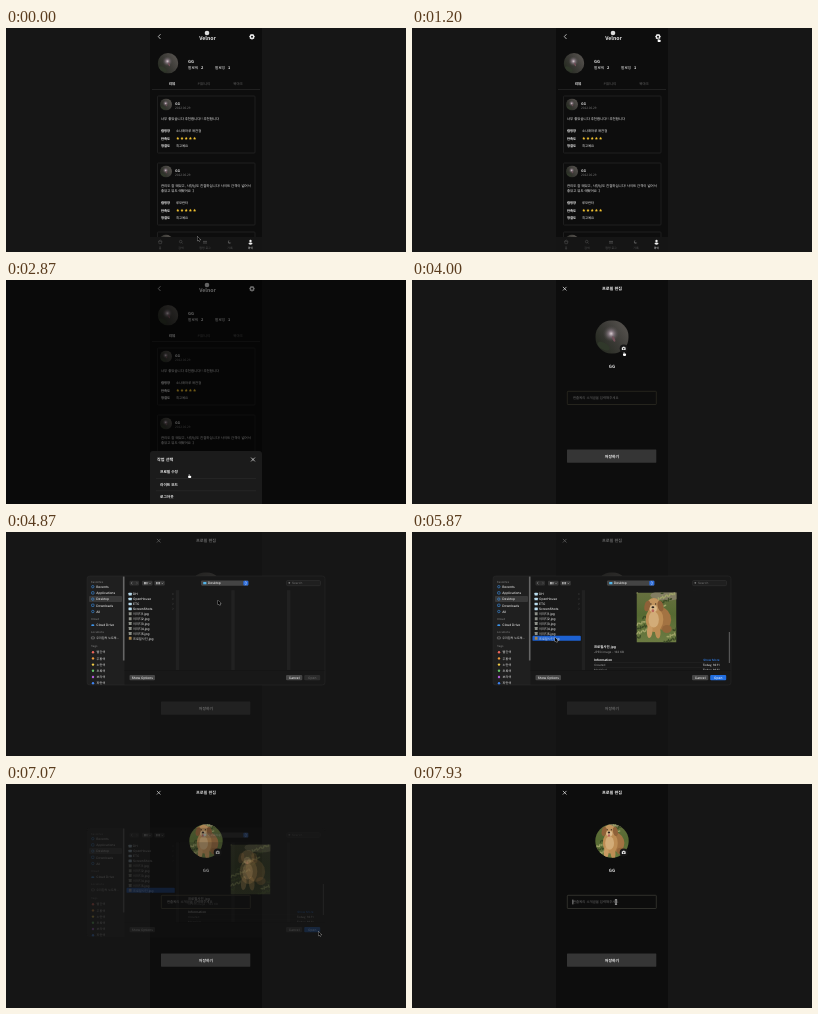
Animation, 400 px wide and 224 px high, one loop 8 s. Source, as an HTML page with a canvas:

```html
<!DOCTYPE html>
<html lang="ko">
<head>
<meta charset="utf-8">
<title>Profile photo</title>
<style>
html, body { margin: 0; width: 100%; height: 100%; overflow: hidden; background: #161616; }
canvas { display: block; width: 100vw; height: 100vh; }
</style>
</head>
<body>
<canvas id="stage"></canvas>
<script>
const W = 400, H = 224, LOOP = 8000;
const FONT = '"Noto Sans CJK KR", "Noto Sans CJK", "Noto Sans", sans-serif';
const UI_FONT = 'Inter, "Noto Sans CJK KR", "Noto Sans CJK", sans-serif';
const canvas = document.getElementById('stage');
const c = canvas.getContext('2d');

function resize() {
  const dpr = devicePixelRatio || 1;
  canvas.width = Math.round(innerWidth * dpr);
  canvas.height = Math.round(innerHeight * dpr);
}
addEventListener('resize', resize);
resize();

const clamp = v => Math.max(0, Math.min(1, v));
const smooth = v => v * v * (3 - 2 * v);
const ramp = (t, from, to) => smooth(clamp((t - from) / (to - from)));

function text(s, x, y, size, color = '#f4f4f4', { weight = 500, align = 'left', font = FONT } = {}) {
  c.font = `${weight} ${size}px ${font}`;
  c.textAlign = align;
  c.textBaseline = 'alphabetic';
  c.fillStyle = color;
  c.fillText(s, x, y + size * 0.38);
}
const bold = { weight: 700 };
const boldMid = { weight: 700, align: 'center' };
const ui = (s, x, y, size = 3.2, color = '#e6e6e6', opts = {}) =>
  text(s, x, y, size, color, { font: UI_FONT, ...opts });

function rect(x, y, w, h, color) {
  c.fillStyle = color;
  c.fillRect(x, y, w, h);
}
function box(x, y, w, h, r, fill, stroke, width = 0.5) {
  c.beginPath();
  c.roundRect(x, y, w, h, r);
  if (fill) { c.fillStyle = fill; c.fill(); }
  if (stroke) { c.strokeStyle = stroke; c.lineWidth = width; c.stroke(); }
}
function disc(x, y, r, color) {
  c.beginPath();
  c.arc(x, y, r, 0, 7);
  c.fillStyle = color;
  c.fill();
}
function oval(x, y, rx, ry, color, turn = 0) {
  c.beginPath();
  c.ellipse(x, y, rx, ry, turn, 0, 7);
  c.fillStyle = color;
  c.fill();
}
function line(points, color, width = 0.7) {
  c.beginPath();
  points.forEach(([x, y]) => c.lineTo(x, y));
  c.strokeStyle = color;
  c.lineWidth = width;
  c.stroke();
}
function cross(x, y, r, color = '#eee') {
  line([[x - r, y - r], [x + r, y + r]], color, 0.7);
  line([[x + r, y - r], [x - r, y + r]], color, 0.7);
}
function chevron(x, y, w, h, color, width = 0.7) {
  line([[x + w, y - h], [x, y], [x + w, y + h]], color, width);
}
function star(x, y, r, color) {
  c.beginPath();
  for (let i = 0; i < 10; i++) {
    const a = i * Math.PI / 5 - Math.PI / 2, d = i % 2 ? r * 0.48 : r;
    c.lineTo(x + d * Math.cos(a), y + d * Math.sin(a));
  }
  c.fillStyle = color;
  c.fill();
}
function clipped(path, draw) {
  c.save();
  c.beginPath();
  path();
  c.clip();
  draw();
  c.restore();
}
function group(alpha, draw) {
  c.save();
  c.globalAlpha = alpha;
  draw();
  c.restore();
}

// Photos, drawn in unit coordinates
function nightPhoto(x, y, r) {
  clipped(() => c.arc(x, y, r, 0, 7), () => {
    c.translate(x, y);
    c.scale(r, r);
    const g = c.createLinearGradient(-0.7, 0.5, 0.7, -0.5);
    g.addColorStop(0, '#292d24');
    g.addColorStop(0.5, '#3b3a36');
    g.addColorStop(1, '#504d49');
    rect(-1, -1, 2, 2, g);
    const glow = c.createRadialGradient(-0.05, -0.2, 0, -0.05, -0.2, 0.5);
    glow.addColorStop(0, '#d8cbd0');
    glow.addColorStop(0.3, '#857880');
    glow.addColorStop(1, '#44424000');
    rect(-1, -1, 2, 2, glow);
    oval(0.1, 0.12, 0.07, 0.18, '#74505a', -0.4);
    oval(-0.5, 0.55, 0.4, 0.2, '#30382a', 0.5);
  });
}
function dogPhoto(x, y, w, h) {
  clipped(() => c.rect(x, y, w, h), () => {
    c.translate(x, y);
    c.scale(w, h);
    const g = c.createLinearGradient(0, 0, 0, 1);
    g.addColorStop(0, '#67703f');
    g.addColorStop(0.45, '#566a32');
    g.addColorStop(1, '#6d7c43');
    rect(0, 0, 1, 1, g);
    oval(0.75, 0.06, 0.4, 0.1, '#827d62');
    for (let i = 0; i < 70; i++) {
      oval((i * 0.618) % 1, (i * 0.377) % 1, 0.04, 0.018, i % 2 ? '#3b4a25' : '#a0a468', i);
    }
    oval(0.62, 0.52, 0.25, 0.22, '#a37342', 0.45);
    oval(0.45, 0.54, 0.22, 0.25, '#bd8d54');
    oval(0.76, 0.73, 0.12, 0.08, '#936539');
    oval(0.33, 0.77, 0.07, 0.14, '#c99b63', 0.1);
    oval(0.53, 0.78, 0.07, 0.14, '#bd8d54', -0.1);
    oval(0.43, 0.54, 0.13, 0.16, '#d2ac78');
    oval(0.43, 0.25, 0.17, 0.14, '#c2955f');
    oval(0.27, 0.27, 0.07, 0.11, '#8f6138', 0.3);
    oval(0.6, 0.27, 0.07, 0.11, '#8f6138', -0.3);
    oval(0.42, 0.32, 0.09, 0.07, '#dbbb8c');
    oval(0.41, 0.295, 0.035, 0.022, '#30231c');
    oval(0.41, 0.365, 0.035, 0.028, '#b9665a');
    disc(0.36, 0.23, 0.016, '#30231c');
    disc(0.48, 0.23, 0.016, '#30231c');
  });
}

function gear(x, y) {
  for (let i = 0; i < 4; i++) {
    const a = i * Math.PI / 4, dx = 2.7 * Math.cos(a), dy = 2.7 * Math.sin(a);
    line([[x - dx, y - dy], [x + dx, y + dy]], '#eee', 1.3);
  }
  disc(x, y, 2.2, '#eee');
  disc(x, y, 1, '#0e0e0e');
}

function review(top, place, lines) {
  const extra = (lines.length - 1) * 5;
  box(151.5, top, 97.5, 57 + extra, 0.8, null, '#303030');
  nightPhoto(160, top + 8.5, 6);
  text('GG', 169, top + 7.2, 3.5, '#eee', bold);
  text('2022.06.29', 169, top + 11.7, 3.1, '#777');
  lines.forEach((s, i) => text(s, 155, top + 23 + i * 5, 3.4));
  const rows = [['캠핑장', place], ['만족도', ''], ['청결도', '최고예요']];
  rows.forEach(([label, value], i) => {
    const y = top + 35 + extra + i * 7.5;
    text(label, 155, y, 3.3, '#fff', bold);
    text(value, 170, y, 3.3);
  });
  for (let i = 0; i < 5; i++) star(171.8 + i * 4.2, top + 42.4 + extra, 1.6, '#f2c230');
}

function navBar() {
  rect(144, 209, 112, 15, '#151515');
  const gray = '#555';
  box(152.8, 213.3, 2.8, 2.4, 0.4, null, gray);
  line([[152, 213.7], [154.2, 212], [156.4, 213.7]], gray, 0.5);
  c.beginPath(); c.arc(174.7, 213.6, 1.3, 0, 7); c.strokeStyle = gray; c.stroke();
  line([[175.7, 214.6], [176.7, 215.6]], gray, 0.5);
  line([[197, 213.4], [201, 213.4]], gray, 0.8);
  line([[197, 215], [201, 215]], gray, 0.8);
  disc(223.5, 214, 1.7, gray);
  disc(224.3, 213.3, 1.4, '#151515');
  disc(244.5, 213, 1.2, '#eee');
  oval(244.5, 215.6, 2, 1.1, '#eee');
  const labels = ['홈', '검색', '캠핑 로그', '기록', '마이'];
  [154, 175, 199, 224, 244.5].forEach((x, i) =>
    text(labels[i], x, 220, 2.9, i === 4 ? '#eee' : gray, { align: 'center' }));
}

function profilePage() {
  chevron(152.3, 8.6, 2.2, 2.4, '#eee', 0.7);
  disc(201, 5, 2.3, '#ddd');
  text('Velnor', 201.5, 10, 5.2, '#eee', boldMid);
  gear(246, 8.7);
  nightPhoto(162, 35.3, 10.3);
  text('GG', 182, 33, 4.2, '#eee', bold);
  text('팔로워', 182, 39.3, 3.7);
  text('2', 195, 39.3, 3.8, '#eee', bold);
  text('팔로잉', 209, 39.3, 3.7);
  text('1', 222, 39.3, 3.8, '#eee', bold);
  text('리뷰', 166, 56, 3.6, '#eee', boldMid);
  text('커뮤니티', 198, 56, 3.5, '#666', { align: 'center' });
  text('북마크', 232, 56, 3.5, '#666', { align: 'center' });
  rect(146, 61.3, 108, 0.5, '#333');
  review(68, '소나래마루 애견점', ['너무 좋았습니다 추천합니다!! 추천합니다']);
  review(132.3 + 2.7, '루모란터', ['관리도 잘 돼있고, 사장님도 친절하십니다! 사이트 간격이 넓어서', '좋았고 뷰도 예뻤어요 :)'].slice(0, 2));
  review(204, '루모란터', ['추천합니다']);
  navBar();
}

function sheet(open) {
  if (!open) return;
  rect(0, 0, W, H, `rgba(0,0,0,${0.55 * open})`);
  c.save();
  c.translate(0, 54 * (1 - open));
  box(144, 171, 112, 56, 3, '#1b1b1b');
  text('작업 선택', 151, 179.5, 4.1, '#eee', bold);
  cross(247, 179.5, 1.9);
  ['프로필 수정', '라이트 모드', '로그아웃'].forEach((s, i) => {
    const y = 192 + i * 12.5;
    text(s, 154, y, 3.7, '#eee', bold);
    if (i < 2) rect(150, y + 6.2, 100, 0.4, '#333');
  });
  c.restore();
}

function editPage(t) {
  const focused = t >= 7780;
  cross(152.7, 8.7, 1.8);
  text('프로필 편집', 200, 8.7, 4.1, '#eee', boldMid);
  if (t < 7000) nightPhoto(200, 57, 16.7);
  else clipped(() => c.arc(200, 57, 16.7, 0, 7), () => dogPhoto(183, 36, 34, 42.5));
  disc(211.7, 68.6, 4, '#161616');
  box(209.8, 67.3, 3.8, 2.8, 0.5, '#eee');
  rect(210.9, 66.7, 1.6, 1, '#eee');
  disc(211.7, 68.7, 0.8, '#222');
  text('GG', 200, 86.2, 4.4, '#eee', boldMid);
  box(155.3, 111.3, 89, 13.2, 0.6, null, focused ? '#505046' : '#3c3a2c');
  text('한줄짜리 소개글을 입력해주세요', 161, 118, 3.4, '#666');
  if (focused) rect(160.6, 115.6, 0.6, 4.8, '#ddd');
  box(155, 169.5, 89.3, 13.2, 0.6, '#353535');
  text('저장하기', 200, 176.1, 3.9, '#eee', boldMid);
}

function sidebar() {
  rect(81, 44, 37.5, 109, '#1f1f1f');
  rect(116.9, 44.5, 1.6, 84, '#666');
  const heading = (s, y) => ui(s, 85, y, 2.8, '#777');
  heading('Favorites', 49.5);
  box(83, 64, 33, 6, 1, '#383838');
  ['Recents', 'Applications', 'Desktop', 'Downloads', 'All'].forEach((s, i) => {
    const y = 54.7 + i * 6.2;
    box(85.6, y - 1.2, 2.4, 2.4, i % 2 ? 0.5 : 1.2, null, '#3d93e8', 0.6);
    ui(s, 90.3, y, 3.2);
  });
  heading('Cloud', 87);
  oval(86.8, 93.2, 1.6, 0.9, '#3d93e8');
  ui('Cloud Drive', 90.3, 93);
  heading('Locations', 100);
  box(85.4, 104.9, 3, 2, 0.3, null, '#999');
  ui('우리집의 노트북…', 90.3, 106, 3);
  heading('Tags', 114.2);
  const tags = [['빨간색', '#ed655b'], ['주황색', '#eb9a3b'], ['노란색', '#f0cb46'],
    ['초록색', '#64c466'], ['보라색', '#b35ddb'], ['파란색', '#3d82f0']];
  tags.forEach(([s, color], i) => {
    disc(87, 120.2 + i * 6.2, 1.2, color);
    ui(s, 90.6, 120.2 + i * 6.2, 3.1);
  });
}

function toolbar() {
  box(123.5, 48.7, 9.5, 4.8, 1, '#2e2e2e');
  chevron(125.2, 51.1, 1.1, 1.3, '#999', 0.5);
  chevron(131.4, 51.1, -1.1, 1.3, '#666', 0.5);
  [136, 148.3].forEach(x => {
    box(x, 48.7, 10.5, 4.8, 1, '#363636');
    for (let i = 0; i < 3; i++) rect(x + 2 + i * 1.3, 50, 0.8, 2.3, '#ccc');
    line([[x + 7, 50.7], [x + 8, 51.7], [x + 9, 50.7]], '#bbb', 0.5);
  });
  box(195, 48.5, 47.5, 5.2, 1.1, '#444');
  box(197.2, 49.9, 3.2, 2.4, 0.4, '#53b4e8');
  ui('Desktop', 202, 51.1, 3.2, '#eee');
  box(237.3, 48.7, 5, 4.8, 1, '#2869d8');
  line([[238.8, 50.6], [239.8, 49.7], [240.8, 50.6]], '#fff', 0.5);
  line([[238.8, 51.6], [239.8, 52.5], [240.8, 51.6]], '#fff', 0.5);
  box(280.5, 48.5, 34, 5.2, 1.1, '#1f1f1f', '#3a3a3a', 0.4);
  disc(283.3, 50.8, 0.9, '#777');
  ui('Search', 286, 51.1, 3.1, '#666');
}

function fileList(selected) {
  const folders = ['DH', 'OpenHouse', 'ETC', 'ScreenShots'];
  const files = ['이미지1.jpg', '이미지2.jpg', '이미지3.jpg', '이미지4.jpg', '이미지5.jpg', '프로필사진.jpg'];
  if (selected) box(120.5, 103.8, 48.3, 5, 0.9, '#1d61d1');
  [...folders, ...files].forEach((s, i) => {
    const y = 62 + i * 4.93, folder = i < folders.length;
    if (folder) {
      box(122.5, y - 1.2, 3.3, 2.6, 0.4, '#b9dcee');
      chevron(167.3, y, -0.8, 1, '#555', 0.4);
    } else {
      box(122.8, y - 1.5, 2.8, 3, 0.2, i === 9 ? '#a5824b' : '#8d9088');
    }
    ui(s, 127, y, 3.2);
  });
}

function preview() {
  rect(173.5, 58.2, 145.5, 80, '#181818');
  rect(316.8, 100, 1.2, 31, '#555');
  dogPhoto(224.5, 60.5, 40, 50);
  ui('프로필사진.jpg', 182, 115, 3.4, '#eee', bold);
  ui('JPEG image - 163 KB', 182, 119.8, 3, '#888');
  ui('Information', 182, 128.2, 3.2, '#eee', bold);
  ui('Show More', 307.5, 128.2, 3, '#2f7de8', { align: 'right' });
  clipped(() => c.rect(174, 58, 144, 80), () => {
    [['Created', 133.2], ['Modified', 138]].forEach(([s, y]) => {
      rect(182, y - 2.6, 125.5, 0.3, '#303030');
      ui(s, 182, y, 3, '#888');
      ui('Today, 16:11', 307.5, y, 3, '#ddd', { align: 'right' });
    });
  });
}

function button(s, x, w, fill, color) {
  box(x, 143, w, 5.3, 1.1, fill);
  ui(s, x + w / 2, 145.6, 3.2, color, { align: 'center' });
}

function fileDialog(selected) {
  clipped(() => c.roundRect(81, 44, 238, 109, 2.6), () => {
    rect(81, 44, 238, 109, '#181818');
    sidebar();
    toolbar();
    [169.8, 225.3, 281].forEach(x => rect(x, 58.2, 3.4, 80, '#212121'));
    if (selected) preview();
    fileList(selected);
    rect(118.5, 138, 200.5, 0.4, '#101010');
    button('Show Options', 123.5, 25.5, '#464646', '#eee');
    button('Cancel', 280, 16.3, '#464646', '#eee');
    button('Open', 298.2, 16, selected ? '#226ee0' : '#2c2c2c', selected ? '#fff' : '#666');
  });
  box(81, 44, 238, 109, 2.6, null, '#303030', 0.4);
}

// Pointer stops: time, x, y
const pointerStops = [
  [0, 191.5, 208.5], [120, 191.5, 208.5], [840, 246.5, 10], [1650, 246.5, 10],
  [2300, 183, 201], [2620, 183, 194], [3440, 183, 194], [3920, 212, 72], [4180, 211.5, 71.5],
  [4450, 211.5, 71.5], [4700, 212, 68.5], [5250, 212, 68.5], [5700, 143, 105.5],
  [5950, 143, 105.5], [6520, 312.5, 147.5], [7100, 312.5, 147.5], [7720, 204, 118], [LOOP, 204, 118]
];
function arrow(x, y) {
  c.beginPath();
  [[0, 0], [0, 4.2], [1, 3.3], [1.7, 4.8], [2.4, 4.5], [1.8, 3.1], [3, 3]]
    .forEach(([dx, dy]) => c.lineTo(x + dx, y + dy));
  c.closePath();
  c.strokeStyle = '#bbb';
  c.lineWidth = 0.7;
  c.stroke();
  c.fillStyle = '#000';
  c.fill();
}
function hand(x, y) {
  box(x - 0.3, y, 1, 3, 0.5, '#fff', '#000', 0.4);
  box(x - 0.9, y + 1.7, 3.1, 2.3, 0.8, '#fff');
}
function beam(x, y) {
  rect(x - 0.4, y - 2.3, 0.8, 4.6, '#eee');
  rect(x - 1.1, y - 2.5, 2.2, 0.6, '#eee');
  rect(x - 1.1, y + 1.9, 2.2, 0.6, '#eee');
}
function pointer(t) {
  const i = pointerStops.findIndex(([time]) => time > t);
  const [t0, x0, y0] = pointerStops[i - 1], [t1, x1, y1] = pointerStops[i];
  const k = ramp(t, t0, t1);
  const overLink = (t > 780 && t < 1700) || (t > 2300 && t < 3500) || (t > 3850 && t < 4500);
  const shape = t > 7600 ? beam : overLink ? hand : arrow;
  shape(x0 + (x1 - x0) * k, y0 + (y1 - y0) * k);
}

function draw(t) {
  c.setTransform(canvas.width / W, 0, 0, canvas.height / H, 0, 0);
  c.textRendering = 'geometricPrecision';
  rect(0, 0, W, H, '#161616');
  rect(144, 0, 112, H, '#0d0d0d');
  if (t < 3000) profilePage();
  else editPage(t);
  sheet(ramp(t, 1280, 1560) * (1 - ramp(t, 3000, 3230)));
  const dialog = ramp(t, 4470, 4640) * (1 - ramp(t, 6920, 7130));
  if (dialog) {
    rect(0, 0, W, H, `rgba(22,22,22,${0.64 * dialog})`);
    group(dialog, () => fileDialog(t >= 5800));
  }
  pointer(t);
}

function tick(now) {
  draw(now % LOOP);
  requestAnimationFrame(tick);
}
requestAnimationFrame(tick);
</script>
</body>
</html>
```
